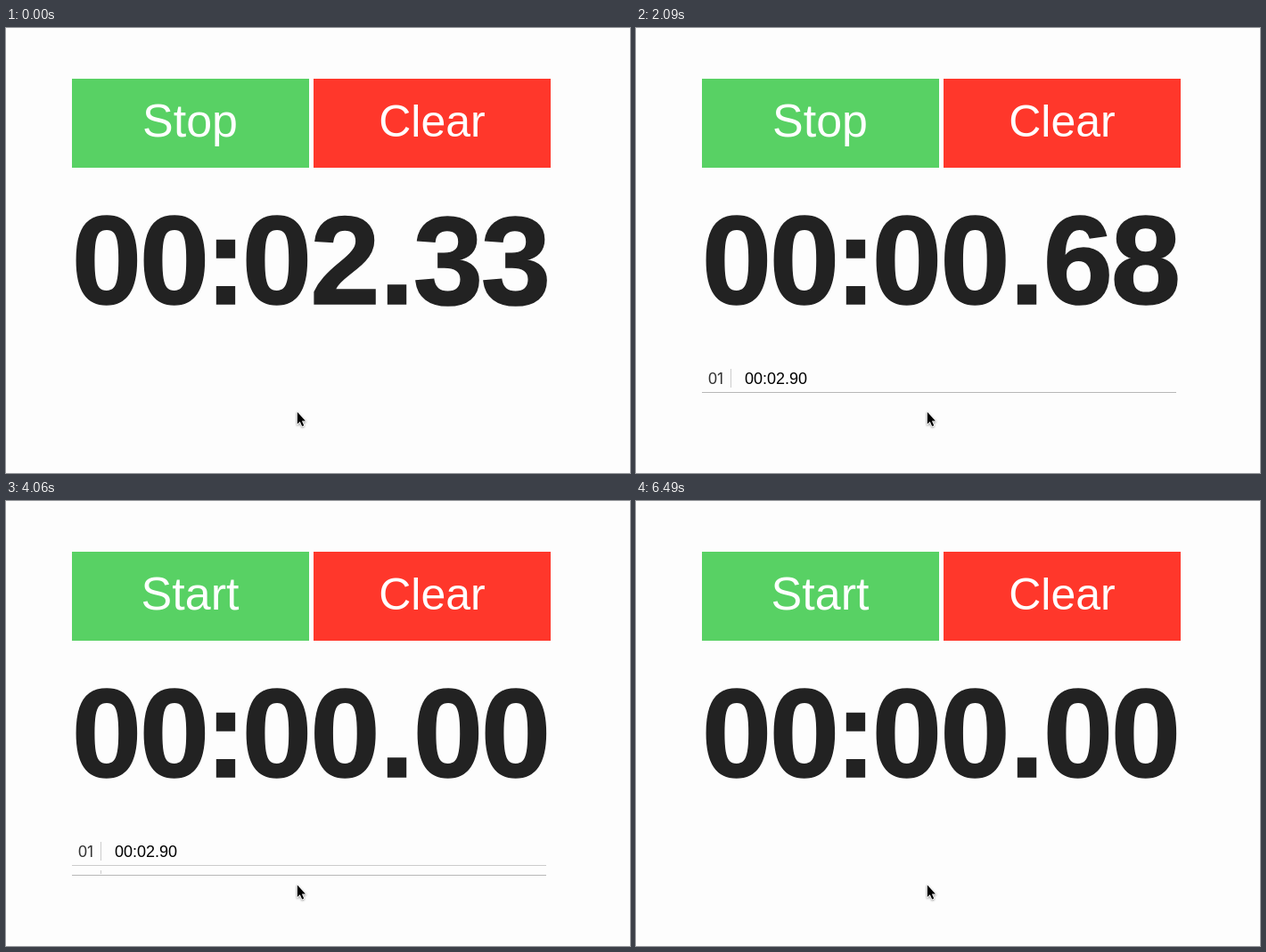
Write an HTML page that moves like this. It is 700 px wide and 500 px high and loops after 7810 ms.

```html
<!DOCTYPE html>
<html lang="en">
<head>
<meta charset="utf-8">
<title>Stopwatch</title>
<style>
  html, body { margin: 0; width: 100%; height: 100%; overflow: hidden; background: #fdfdfd; }
  svg { display: block; width: 700px; height: 500px; font-family: "Liberation Sans", Arial, sans-serif; }
  .button { fill: #fff; text-anchor: middle; }
  #clock { font-size: 141px; font-weight: bold; text-anchor: middle; fill: #222; stroke: #222; stroke-width: 1.5px; }
  .lap { font-size: 18px; }
  /* A one without a foot */
  .one { font-family: Inter, sans-serif; font-size: .965em; letter-spacing: .08em; }
  #cursor { filter: drop-shadow(0 1px 1px rgba(0, 0, 0, .4)); }
</style>
</head>
<body>
<svg viewBox="0 0 700 500">
  <rect x="74" y="57" width="266" height="100" fill="#58d164"/>
  <rect x="345" y="57" width="266" height="100" fill="#ff372b"/>
  <text id="toggle" class="button" x="206.5" y="122" font-size="52"></text>
  <text class="button" x="478" y="122" font-size="50">Clear</text>
  <text id="clock" x="113 189 246.5 304 380.5 438.5 496 572" y="309.5"></text>
  <g id="list"></g>
  <path id="cursor" d="M326.8 431.5v13.6l3-2.8 2.4 5.1 2-.9-2.3-4.9h4.1z"
    stroke="#fff" stroke-width="1.6" stroke-linejoin="round" paint-order="stroke"/>
</svg>
<script>
const LOOP = 7810, TICK = 57.5, TICK_SECONDS = 0.06095;
const ROW_TOP = 378, ROW_HEIGHT = 32, CLEAR_AT = 6290, CLEAR_STEP = 66;

// start and stop in ms; first and lap are clock readings in seconds
const runs = [
  { start: -7, stop: 540, first: 2.335, lap: 2.9 },
  { start: 1400, stop: 4000, first: -0.05, lap: 2.68 },
  { start: 4560, stop: 5670, first: -0.007, lap: 1.19 },
];

const byId = id => document.getElementById(id);
const [toggle, clock, list] = ['toggle', 'clock', 'list'].map(byId);
const pad = n => String(n).padStart(2, '0');
const styled = digits => digits.replace(/1/g, '<tspan class="one">1</tspan>');

function format(seconds) {
  const c = Math.floor(seconds * 100 + 1e-6);
  return `${pad(Math.floor(c / 6000))}:${pad(Math.floor(c / 100) % 60)}.${pad(c % 100)}`;
}

function reading(run, t) {
  const ticks = Math.floor((t - run.start) / TICK);
  return Math.min(run.lap, Math.max(0, run.first + ticks * TICK_SECONDS));
}

// A new row unfolds in four visible steps
function rowHeight(age) {
  return age < 60 ? 1 : age < 140 ? 11 : age < 200 ? 25 : ROW_HEIGHT;
}

runs.forEach((run, i) => {
  run.row = document.createElementNS('http://www.w3.org/2000/svg', 'g');
  run.row.setAttribute('class', 'lap');
  run.row.setAttribute('transform', `translate(74 ${ROW_TOP + i * ROW_HEIGHT})`);
  run.row.innerHTML = `
    <clipPath id="clip${i}"><rect width="533"/></clipPath>
    <g clip-path="url(#clip${i})">
      <text x="7" y="22" fill="#333">${styled(pad(i + 1))}</text>
      <rect x="32" y="5" width="1" height="21" fill="#ccc"/>
      <text x="48" y="22">${styled(format(run.lap))}</text>
    </g>
    <rect class="line" width="532" height="1"/>`;
  run.clip = run.row.querySelector('clipPath rect');
  run.line = run.row.querySelector('.line');
  list.append(run.row);
});

function draw(t) {
  const active = runs.find(r => t >= r.start && t < r.stop);
  toggle.textContent = active ? 'Stop' : 'Start';
  clock.innerHTML = styled(format(active ? reading(active, t) : 0));

  const done = runs.filter(r => t >= r.stop);
  runs.forEach((run, i) => {
    const height = rowHeight(t - run.stop);
    run.row.setAttribute('visibility', i < done.length ? 'visible' : 'hidden');
    run.clip.setAttribute('height', Math.max(0, height - 2));
    run.line.setAttribute('y', height - 1);
    run.line.setAttribute('fill', i === done.length - 1 ? '#b8b8b8' : '#ccc');
  });

  const step = t < CLEAR_AT ? 0 : Math.min(4, 1 + Math.floor((t - CLEAR_AT) / CLEAR_STEP));
  list.setAttribute('opacity', 1 - step / 4);
  list.setAttribute('transform', `translate(0 ${-8 * step})`);
}

const began = performance.now();
function frame() {
  draw((performance.now() - began) % LOOP);
  requestAnimationFrame(frame);
}
frame();
</script>
</body>
</html>
```
